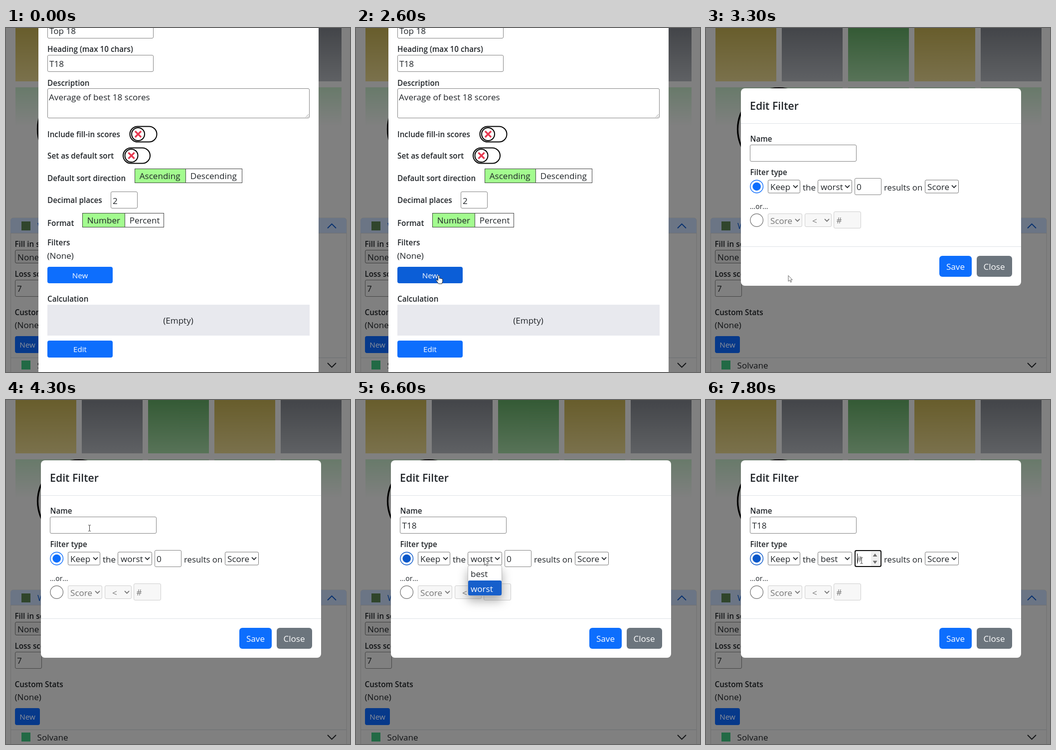
Animation, 690 px wide and 690 px high, one loop 8000 ms. Source, as an HTML page:

```html
<!DOCTYPE html>
<html lang="en">
<head>
<meta charset="utf-8">
<title>Edit filter</title>
<style>
html, body { margin: 0; width: 100%; height: 100%; overflow: hidden; background: #808080; }
svg { display: block; width: 100vw; height: 100vh; }
text { font: 400 17.1px "Open Sans", "Noto Sans", sans-serif; fill: #212529; white-space: pre; }
.label { font-size: 15.25px; font-weight: 600; }
.title { font-size: 21.3px; font-weight: 600; }
.small { font-size: 14px; }
.btn { font-size: 15.2px; font-weight: 500; fill: #fff; }
.big { fill: #fff; }
.mid { text-anchor: middle; }
.grey { fill: #757575; }
.dim { fill: #101214; }
.off { display: none; }
</style>
</head>
<body>
<svg id="stage" viewBox="0 0 690 690" xmlns="http://www.w3.org/2000/svg"></svg>
<script>
const LOOP = 8000, STEP = 100;
const BLUE = '#0d6efd', HOVER = '#0b5ed7';

// Markup helpers
const text = (x, y, s, cls = '', more = '') =>
  `<text x="${x}" y="${y}" class="${cls}" ${more}>${s.replace('<', '&lt;')}</text>`;
const rect = (l, t, r, b, fill, rx = 0, more = '') =>
  `<rect x="${l}" y="${t}" width="${r - l}" height="${b - t}" rx="${rx}" fill="${fill}" ${more}/>`;
const box = (l, t, r, b, fill = '#fff', stroke = '#858585', rx = 2.5) =>
  rect(l + .5, t + .5, r - .5, b - .5, fill, rx, `stroke="${stroke}"`);
const path = (d, stroke, width, fill = 'none') =>
  `<path d="${d}" stroke="${stroke}" stroke-width="${width}" fill="${fill}"/>`;
const circle = (x, y, r, fill, stroke = 'none', width = 0, more = '') =>
  `<circle cx="${x}" cy="${y}" r="${r}" fill="${fill}" stroke="${stroke}" stroke-width="${width}" ${more}/>`;
const group = (id, body, cls = '') => `<g id="${id}" class="${cls}">${body}</g>`;
const arrowDown = (x, y, color) => path(`M${x - 4.5} ${y - 2.3}l4.5 4.5l4.5 -4.5`, color, 1.8);
const grad = (id, a, b) =>
  `<linearGradient id="${id}" x2="0" y2="1"><stop stop-color="${a}"/><stop offset="1" stop-color="${b}"/></linearGradient>`;

function select(l, t, r, s, x, disabled) {
  const ink = disabled ? '#757575' : '#212529';
  return box(l, t, r, t + 27, disabled ? '#f7f7f7' : '#fff', disabled ? '#cfcfcf' : '#767676') +
    (s ? text(x, t + 20.5, s, disabled ? 'grey' : '') : '') + arrowDown(r - 9.5, t + 13.5, ink);
}

function toggle(x, y) {
  return rect(x + 1, y + 1, x + 55, y + 32, '#fff', 15.5, 'stroke="#000" stroke-width="2"') +
    circle(x + 17.5, y + 16.5, 13, '#fff', '#000', 2) +
    path(`M${x + 11.5} ${y + 10.5}l12 12m0 -12l-12 12`, '#e63950', 3.4);
}

function choice(l, mid, r, t, b, one, two) {
  return box(l, t, mid + 1, b, '#a3fc8f', '#3c4a3a', 0) + box(mid, t, r, b, '#fff', '#444', 0) +
    text(l + 9.7, t + 21, one) + text(mid + 9.7, t + 21, two);
}

const defs = '<defs>' +
  grad('yellow', '#685d2c', '#7a714c') + grad('slate', '#434549', '#5f6164') +
  grad('green', '#345a35', '#587358') + grad('pale', '#687a6a', '#808080') +
  '<filter id="shade" x="-60%" y="-60%" width="220%" height="260%">' +
  '<feDropShadow dx="0" dy="10" stdDeviation="10" flood-opacity=".32"/></filter></defs>';

function page() {
  const tiles = ['yellow', 'slate', 'green', 'yellow', 'slate'].map((c, i) => {
    const x = 19 + i * 133;
    return rect(x, 0, x + 122, 107, `url(#${c})`) + rect(x, 119, x + 122, 197, 'url(#pale)');
  }).join('');
  return tiles + circle(146, 203, 82.5, 'none', '#000', 3.2) +
    path('M9.5 690V387q0 -6 6 -6H677q6 0 6 6V690', '#707070', 1) +
    path('M9 411V387q0 -6 6 -6H677q6 0 6 6V411z', 'none', 0, '#6b7585') +
    path('M9 411.5H683M9 661.5H683', '#6c6f73', 1) +
    rect(31, 388, 49, 406, '#30452b') + rect(31, 667, 49, 685, '#226a45') +
    text(63, 403, 'W', '', 'style="fill:#07306e"') + text(62.5, 683, 'Solvane', 'dim') +
    path('M645 401.5l8.5 -8.5l8.5 8.5', '#07306e', 1.8) +
    path('M645 672l8.5 8.5l8.5 -8.5', '#101214', 1.8) +
    text(17.5, 439, 'Fill in scores', 'label dim') +
    box(18, 445, 96, 472, '#7b7b7b', '#3e3e3e') + text(23, 466, 'None', 'dim') +
    text(17.5, 499, 'Loss score', 'label dim') +
    box(18, 505, 72, 539, '#808080', '#454545') + text(22, 529, '7', 'dim') +
    text(17.5, 575.5, 'Custom Stats', 'label dim') + text(17.5, 602, '(None)', 'dim') +
    rect(18, 618, 68, 652, '#07398a', 4) +
    text(43, 640.5, 'New', 'btn mid', 'style="fill:#8d929b"');
}

function statForm() {
  return rect(65, 0, 627, 690, '#fff') +
    box(83, -14, 296, 21) + text(87, 11.5, 'Top 18') +
    text(83, 47.5, 'Heading (max 10 chars)', 'label') +
    box(83, 54, 296, 88) + text(87, 78, 'T18') +
    text(83, 115.5, 'Description', 'label') +
    box(83, 121, 609, 181) + text(86, 145, 'Average of best 18 scores') +
    path('M601 179l6 -6m-2.5 6l2.5 -2.5', '#999', 1) +
    text(83, 219, 'Include fill-in scores', 'label') + toggle(247.5, 196.5) +
    text(83, 262, 'Set as default sort', 'label') + toggle(234, 239.5) +
    text(83, 306.5, 'Default sort direction', 'label') +
    choice(258, 360, 474, 282, 311, 'Ascending', 'Descending') +
    text(83, 351, 'Decimal places', 'label') + box(210, 328, 264, 362) + text(214, 353, '2') +
    text(83, 396.5, 'Format', 'label') + choice(153, 238, 317, 371, 400, 'Number', 'Percent') +
    text(83, 436, 'Filters', 'label') + text(82.5, 463, '(None)') +
    rect(83, 479, 214, 512, BLUE, 4, 'id="newBtn"') + text(148.5, 501.5, 'New', 'btn mid') +
    text(83, 548.5, 'Calculation', 'label') + rect(83, 555, 609, 617, '#e8e9ee') +
    text(345.5, 593, '(Empty)', 'mid') +
    rect(83, 627, 214, 661, BLUE, 4) + text(148.5, 649.5, 'Edit', 'btn mid');
}

function filterForm() {
  const focusRing = (l, t, r, b) =>
    rect(l, t, r, b, '#fff', 3, 'stroke="#101010" stroke-width="2"');
  return rect(70, 121, 632, 517, '#fff', 8) +
    path('M70 191.5H632M70 438.5H632', '#dee2e6', 1) +
    text(88, 164.3, 'Edit Filter', 'title') +
    text(88.5, 228, 'Name', 'label') + box(88, 234, 302, 268) +
    group('nameFocus', focusRing(89, 235, 301, 267)) +
    text(92.5, 258, '', '', 'id="name"') +
    '<path id="nameCaret" stroke="#000" stroke-width="1"/>' +
    text(88.5, 294.5, 'Filter type', 'label') +
    circle(101.7, 318, 12.8, '#fff', BLUE, 1.4, 'id="ring"') + circle(101.7, 318, 8.3, BLUE, 'none', 0, 'id="dot"') +
    select(124, 304.5, 189, 'Keep', 129) + text(194, 326, 'the') +
    select(224, 304.5, 293, '', 230) + text(230, 325, 'worst', '', 'id="rank"') +
    box(298, 301, 352, 335) +
    group('countFocus', focusRing(299, 302, 351, 334) +
      rect(331, 304, 347, 333, '#efefef') +
      '<path d="M334.5 314h9l-4.5 -6zM334.5 322.5h9l-4.5 6z" fill="#6f6f6f"/>') +
    text(302, 325, '0', '', 'id="count"') +
    group('countCaret', path('M303.5 308V328', '#000', 1)) +
    text(357, 326, 'results on', '', 'style="font-size:16.8px"') + select(439, 304.5, 507, 'Score', 444) +
    text(88, 363, '...or...', 'small') + circle(101.7, 385.5, 12.8, '#fff', '#707070', 1.2) +
    select(124, 372, 193, 'Score', 129, true) + select(198, 372, 252, '<', 213, true) +
    box(256, 368, 311, 402, '#f7f7f7', '#cfcfcf') + text(261.5, 392, '#', 'grey') +
    rect(468, 457, 533, 499, BLUE, 6) + text(500.5, 485, 'Save', 'big mid') +
    rect(543, 457, 614, 499, '#6c757d', 6) + text(578, 485, 'Close', 'big mid') +
    group('menu', rect(224.5, 331.5, 292.5, 392.5, '#fff', 4, 'stroke="#bbb" filter="url(#shade)"') +
      rect(225, 332, 292, 362, '#175fcb', 3, 'id="pick"') +
      text(230, 354.5, 'best', '', 'id="optBest"') + text(230, 384.5, 'worst', '', 'id="optWorst"'));
}

const cursors =
  group('arrow', path('M.5 .5V12.2L3.2 9.7L5.2 14L7 13.2L5.1 9.1H8.7Z', '#555', .9, '#fff')) +
  group('beam', path('M-2.5 -6H-.6L0 -5.4L.6 -6H2.5M0 -5.4V5.4M-2.5 6H-.6L0 5.4L.6 6H2.5', '#333', 1)) +
  group('hand', path('M-1.5 1.2q1.5 -2 3 0V6.3q1.4 -1 2.4 .3q1.5 -.8 2.3 .5q1.6 -.4 1.8 1.2V12.5L6.3 17H-.3' +
    'L-4.8 10.6q-.3 -1.8 1.4 -1.6L-1.5 10.6Z', '#222', 1, '#fff'));

const stage = document.getElementById('stage');
stage.innerHTML = defs + page() + group('stat', statForm()) + group('filter', filterForm()) + group('cursor', cursors);

const el = {};
stage.querySelectorAll('[id]').forEach(n => el[n.id] = n);
const show = (id, on) => el[id].classList.toggle('off', !on);

// Pointer stops: time, x, y
const route = [
  [1500, 335, 255], [2000, 213.5, 416.5], [2300, 166, 496], [3500, 164.5, 496],
  [4200, 167.5, 257], [5700, 167.5, 257], [6400, 257, 319], [6700, 257, 319],
  [7100, 246, 350], [7400, 246, 350], [7700, 312, 322], [LOOP, 312, 322]
];

function pointer(t) {
  let i = 0;
  while (i < route.length - 2 && t >= route[i + 1][0]) i++;
  const [t0, x0, y0] = route[i], [t1, x1, y1] = route[i + 1];
  const p = Math.min(1, Math.max(0, (t - t0) / (t1 - t0))), e = p * p * (3 - 2 * p);
  return [x0 + (x1 - x0) * e, y0 + (y1 - y0) * e];
}

const T = { open: 3300, focus: 4400, keys: [4900, 5100, 5300], menu: 6500, best: 7000, chosen: 7400, count: 7700, clear: 7800 };
const blink = (t, from) => (t - from) % 1000 < 500;
const inside = (x, y, l, t, r, b) => x >= l && x <= r && y >= t && y <= b;

function draw(t) {
  const editing = t >= T.open, [x, y] = pointer(t);
  show('stat', !editing);
  show('filter', editing);

  const onNew = !editing && t >= 1500 && inside(x, y, 83, 479, 214, 512);
  el.newBtn.setAttribute('fill', onNew ? HOVER : BLUE);

  const typed = T.keys.filter(k => t >= k).length;
  const naming = t >= T.focus && t < T.menu;
  el.name.textContent = 'T18'.slice(0, typed);
  show('nameFocus', naming);
  show('nameCaret', naming && blink(t, typed ? T.keys[typed - 1] : T.focus));
  const caret = [93.5, 103.5, 112.5, 121.5][typed];
  el.nameCaret.setAttribute('d', `M${caret} 240V262`);

  const open = t >= T.menu && t < T.chosen, best = t >= T.best;
  show('menu', open);
  el.pick.setAttribute('y', best ? 332 : 362);
  el.optBest.style.fill = best ? '#fff' : '';
  el.optWorst.style.fill = best ? '' : '#fff';
  el.rank.textContent = t >= T.chosen ? 'best' : 'worst';

  const radio = t >= 6300 ? '#0a58ca' : BLUE;
  el.ring.setAttribute('stroke', radio);
  el.dot.setAttribute('fill', radio);

  const cleared = t >= T.clear;
  show('countFocus', t >= T.count);
  show('countCaret', t >= T.clear);
  el.count.textContent = cleared ? '#' : '0';
  el.count.style.fill = cleared ? '#757575' : '';

  const onField = editing && !open &&
    (inside(x, y, 88, 234, 301, 268) || inside(x, y, 298, 302, 352, 335));
  show('cursor', t >= 1500);
  show('hand', onNew);
  show('beam', onField);
  show('arrow', !onNew && !onField);
  el.cursor.setAttribute('transform', `translate(${x.toFixed(1)} ${y.toFixed(1)})`);
}

const start = performance.now();
function frame(now) {
  const t = Math.max(0, now - start) % LOOP;
  draw(Math.floor(t / STEP) * STEP);
  requestAnimationFrame(frame);
}
draw(0);
requestAnimationFrame(frame);
</script>
</body>
</html>
```
